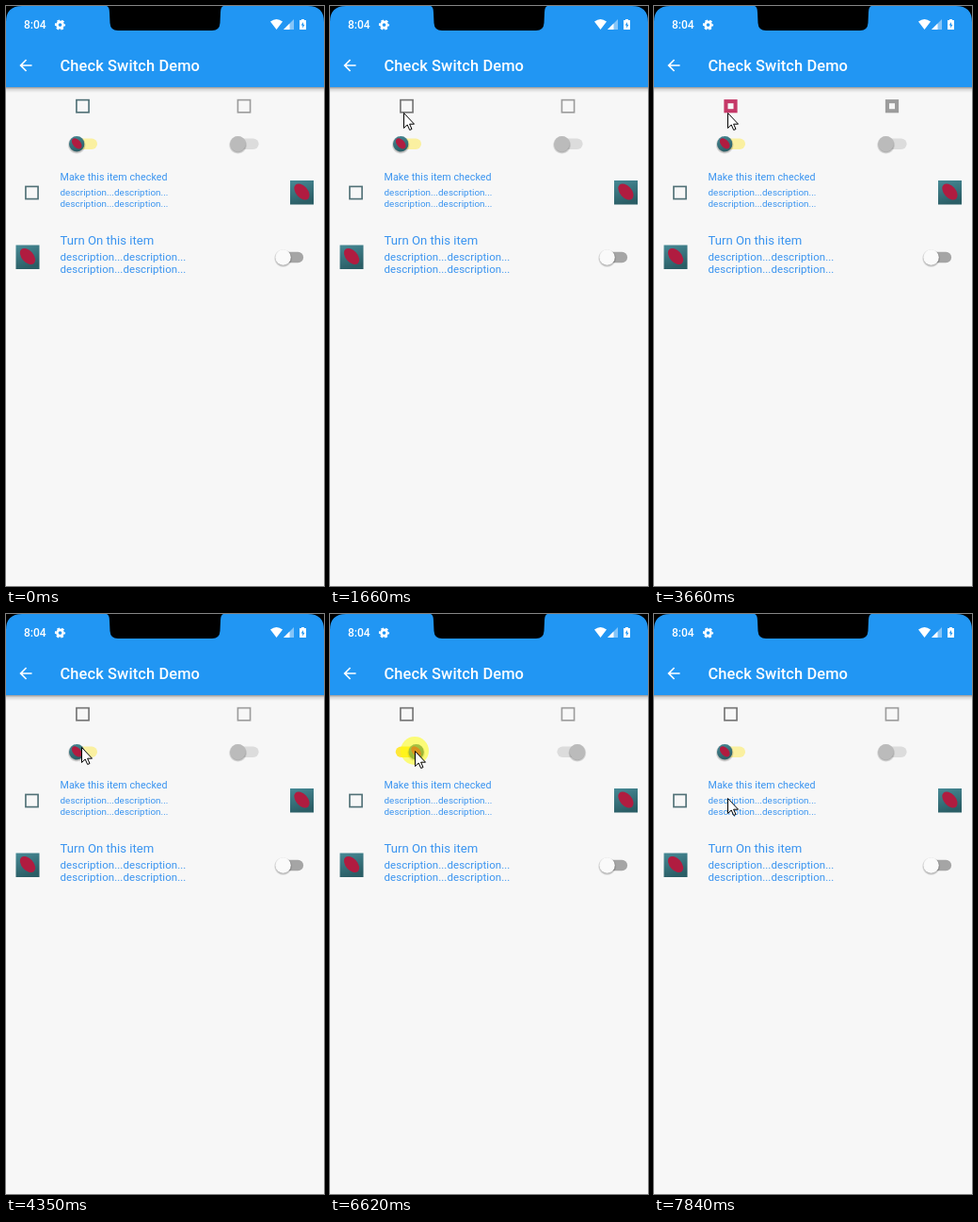
Animation, 338 px wide and 615 px high, one loop 8 s. Source, as an HTML page:

```html
<!DOCTYPE html>
<html lang="en">
<head>
<meta charset="utf-8">
<title>Check Switch Demo</title>
<style>
  html, body { margin: 0; width: 100%; height: 100%; overflow: hidden; background: #f7f7f7; }
  svg { display: block; width: 100vw; height: 100vh; }
  text { font-family: Roboto, Inter, sans-serif; fill: #3a94f0; }
  .bar { fill: #fff; font-weight: 500; }
  .sub { letter-spacing: .05px; }
</style>
</head>
<body>
<svg viewBox="0 0 338 615" xmlns="http://www.w3.org/2000/svg">
  <defs>
    <linearGradient id="shade" x2="0" y2="1">
      <stop offset="0" stop-opacity=".38"/>
      <stop offset=".4" stop-opacity=".13"/>
      <stop offset="1" stop-opacity="0"/>
    </linearGradient>
    <linearGradient id="sea" x2=".3" y2="1">
      <stop offset="0" stop-color="#478a96"/>
      <stop offset="1" stop-color="#2b5e66"/>
    </linearGradient>
    <radialGradient id="glow">
      <stop offset=".75" stop-opacity=".3"/>
      <stop offset="1" stop-opacity="0"/>
    </radialGradient>
    <clipPath id="round"><circle r="8.2"/></clipPath>
    <g id="picture">
      <rect width="25" height="25.5" fill="url(#sea)"/>
      <ellipse cx="12.5" cy="12" rx="10" ry="6.2" transform="rotate(48 12.5 12)" fill="#b01c40"/>
    </g>
    <circle id="shadow" cy="1" r="9.8" fill="url(#glow)"/>
    <rect id="track" x="-13.6" y="-5.75" width="27.2" height="11.5" rx="5.75"/>
  </defs>

  <rect width="338" height="615" fill="#f7f7f7"/>
  <rect y="86" width="338" height="6" fill="url(#shade)"/>
  <rect width="338" height="86" fill="#2196f3"/>
  <path d="M0 0H17Q0 0 0 17ZM338 0H321Q338 0 338 17Z"/>
  <path d="M107 0Q110 1 110 7L110.5 18Q111 26 119 26H219Q227 26 227.500 18L228 7Q228 1 231 0Z"/>

  <text class="bar" x="19" y="24.300" font-size="12">8:04</text>
  <g fill="none" stroke="#fff" transform="translate(57.500 20)">
    <circle r="3.100" stroke-width="2.600"/>
    <circle r="4.700" stroke-width="1.800" stroke-dasharray="2.700 2.222" stroke-dashoffset="1.350"/>
  </g>
  <g fill="#fff">
    <path d="M281 16.500Q287.500 11.500 294 16.500L287.500 25Z"/>
    <path d="M306 14V25H295Z" opacity=".45"/>
    <path d="M301.500 18.500V25H295Z"/>
    <path d="M314 14H317V15H319V25H312V15H314Z"/>
    <path d="M316 17L313.700 20.600H315.200V23.500L317.500 19.700H316Z" fill="#2196f3"/>
    <path transform="translate(11.100 53.100) scale(.822)" d="M20 11H7.830l5.590-5.590L12 4l-8 8 8 8 1.410-1.410L7.830 13H20z"/>
  </g>
  <text class="bar" x="57.500" y="69" font-size="16.440" letter-spacing=".1">Check Switch Demo</text>

  <text x="57.500" y="184.700" font-size="10.690" letter-spacing=".08">Make this item checked</text>
  <g class="sub" font-size="9.870">
    <text x="57.500" y="201">description...description...</text>
    <text x="57.500" y="212.700">description...description...</text>
  </g>
  <text x="57.500" y="253" font-size="13.150">Turn On this item</text>
  <g class="sub" font-size="11.510">
    <text x="57.500" y="269.700">description...description...</text>
    <text x="57.500" y="283.200">description...description...</text>
  </g>
  <use href="#picture" x="302" y="185"/>
  <use href="#picture" x="10.500" y="253.500"/>

  <g id="boxes"></g>

  <use id="mainTrack" href="#track" x="83.400" y="146.300"/>
  <use href="#track" x="255" y="146.300" fill="#dcdcdc"/>
  <use href="#track" x="302.500" y="266.500" fill="#a5a5a5"/>
  <g id="mainThumb">
    <use href="#shadow"/>
    <g clip-path="url(#round)"><use href="#picture" transform="translate(-8.250 -8.400) scale(.66)"/></g>
  </g>
  <g id="greyThumb"><use href="#shadow"/><circle r="8.200" fill="#bbb"/></g>
  <g transform="translate(294.600 266.500)"><use href="#shadow"/><circle r="8.200" fill="#fafafa"/></g>

  <circle id="ripple"/>
  <circle id="press" r="15" fill="#ff0" fill-opacity=".52"/>
  <path id="cursor" d="M.5 .5V16.500L4.200 13L6.700 18.500L9 17.500L6.600 12.200H11.500Z" fill="#fff" stroke="#000"/>
</svg>
<script>
const LOOP = 8000, DP = 0.822, TOGGLE = 210;
const $ = id => document.getElementById(id);
const clamp = v => Math.min(1, Math.max(0, v));
const mix = (a, b, u) => a + (b - a) * u;
const smooth = u => u * u * (3 - 2 * u);
const set = (el, attrs) => { for (const k in attrs) el.setAttribute(k, attrs[k]); };
const rgb = (a, b, u) => `rgb(${a.map((v, i) => Math.round(mix(v, b[i], u)))})`;

const PINK = [233, 30, 99], GREY = [116, 116, 116], SLATE = [80, 112, 118], DISABLED = [156, 156, 156];

// start time, old value, new value
const checks = [[1760, 'none', 'check'], [2640, 'check', 'dash'], [3470, 'dash', 'none']];
const presses = [[1430, 1660], [2410, 2560], [3200, 3380], [4580, 4810], [6620, 6800]];

// time, x, y of the pointer tip
const moves = [
  [60, 268, 612], [890, 81, 131], [920, 81, 131], [1120, 78, 113], [3860, 78, 113],
  [4350, 80, 141], [6000, 80, 141], [6210, 90, 145], [7330, 90, 145],
  [7570, 55, 190], [7690, 64, 203], [7840, 78, 195], [LOOP, 78, 195]
];
// start, x, y, colour
const ripples = [
  [2560, 81.5, 106, '#e91e63'], [3380, 81.5, 106, '#e91e63'],
  [4810, 75, 146, '#ffeb3b'], [6800, 92, 146, '#ffeb3b']
];

function makeBox(x, y) {
  const ns = 'http://www.w3.org/2000/svg';
  const g = document.createElementNS(ns, 'g');
  const frame = document.createElementNS(ns, 'rect');
  const mark = document.createElementNS(ns, 'polyline');
  set(g, { transform: `translate(${x} ${y}) scale(${DP})`, fill: 'none' });
  set(mark, { stroke: '#f7f7f7', 'stroke-width': 2 });
  g.append(frame, mark);
  $('boxes').append(g);
  return { frame, mark };
}

function markPoints(kind, u) {
  if (u <= 0 || kind === 'none') return '';
  if (kind === 'dash') return `${-5.4 * u},0 ${5.4 * u},0`;
  const start = [-6.3, -0.9], mid = [-1.8, 3.6], end = [6.3, -4.5];
  const along = (a, b, w) => a.map((v, i) => mix(v, b[i], w));
  return u < 0.5
    ? `${start} ${along(start, mid, u * 2)}`
    : `${start} ${mid} ${along(mid, end, u * 2 - 1)}`;
}

function drawBox(box, { fill, kind, shown }, off, on) {
  const size = 18 - 2 * (1 - Math.abs(fill - 0.5) * 2);
  const edge = Math.min(size / 2, 2 + size * fill);
  const side = size - edge;
  set(box.frame, {
    x: -side / 2, y: -side / 2, width: side, height: side,
    'stroke-width': edge, stroke: rgb(off, on, clamp(fill * 4))
  });
  set(box.mark, { points: markPoints(kind, shown) });
}

function checkState(t) {
  const step = checks.filter(c => t >= c[0]).pop();
  if (!step) return { fill: 0, kind: 'none', shown: 0 };
  const [start, from, to] = step;
  const u = clamp((t - start) / TOGGLE);
  if (from === 'none') {
    const p = u * u;
    return { fill: p, kind: to, shown: p * 2 - 1 };
  }
  if (to === 'none') {
    const p = 1 - u * u;
    return { fill: p, kind: from, shown: p * 2 - 1 };
  }
  return { fill: 1, kind: u <= 0.5 ? from : to, shown: Math.abs(1 - u * 2) };
}

function pointer(t) {
  const i = Math.max(1, moves.findIndex(m => t < m[0]));
  const [t0, x0, y0] = moves[i - 1], [t1, x1, y1] = moves[i];
  const u = smooth(clamp((t - t0) / (t1 - t0)));
  return [mix(x0, x1, u), mix(y0, y1, u)];
}

const mainBox = makeBox(81.5, 106.2), greyBox = makeBox(253, 106.2), listBox = makeBox(27.5, 198);
drawBox(listBox, checkState(0), SLATE, PINK);

function render(t) {
  const check = checkState(t);
  drawBox(mainBox, check, t < 1430 ? SLATE : GREY, PINK);
  drawBox(greyBox, check, DISABLED, DISABLED);

  const on = smooth(clamp((t - 4870) / 200)) - smooth(clamp((t - 6830) / 190));
  const shift = mix(-8.2, 8.2, on);
  set($('mainTrack'), { fill: rgb([250, 240, 160], [255, 232, 58], on) });
  set($('mainThumb'), { transform: `translate(${83.4 + shift} 146.3)` });
  set($('greyThumb'), { transform: `translate(${254.7 + shift} 146.3)` });

  const wave = ripples.find(r => t >= r[0] && t < r[0] + 260);
  set($('ripple'), { r: 0 });
  if (wave) {
    const u = (t - wave[0]) / 260;
    set($('ripple'), {
      cx: wave[1], cy: wave[2], fill: wave[3],
      r: 16 * clamp(u * 2), opacity: 0.14 * (1 - u)
    });
  }

  const [x, y] = pointer(t).map(Math.round);
  const pressed = presses.some(([down, up]) => t >= down && t < up);
  set($('press'), { cx: x, cy: y, visibility: pressed ? 'visible' : 'hidden' });
  set($('cursor'), { transform: `translate(${x} ${y})`, visibility: t < 100 ? 'hidden' : 'visible' });
}

function tick() {
  render(performance.now() % LOOP);
  requestAnimationFrame(tick);
}
tick();
</script>
</body>
</html>
```
